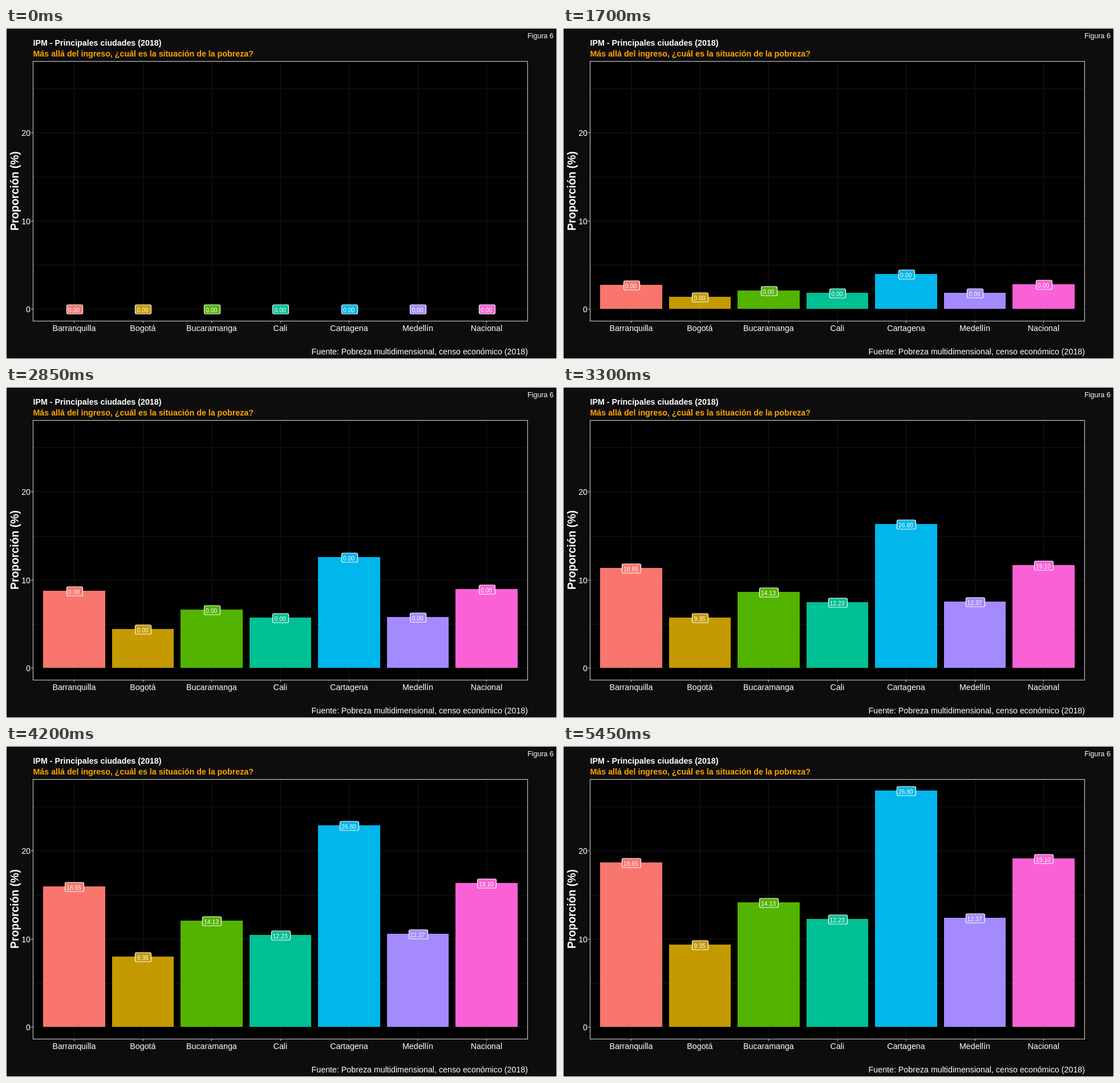
Animation of 966 by 580 pixels, one loop 8 s. Source, as an HTML page:

```html
<!DOCTYPE html>
<html lang="es">
<head>
<meta charset="utf-8">
<style>
  html, body { margin: 0; width: 966px; height: 580px; overflow: hidden; background: #0d0d0d; }
  svg { display: block; font: 14.25px "Liberation Sans", Arial, sans-serif; fill: #fff; }
  .bold { font-weight: bold; }
  .grid { stroke: #161616; }
  .tick { stroke: #b3b3b3; }
  .tag { font-size: 10.4px; text-anchor: middle; }
</style>
</head>
<body>
<svg id="stage" width="966" height="580" viewBox="0 0 966 580">
  <rect x=".5" y=".5" width="965" height="579" fill="#0d0d0d" stroke="#fff"/>
  <rect x="47" y="58" width="868" height="456" fill="#000"/>
  <g id="grid"></g>
  <g id="bars"></g>
  <rect x="47.5" y="58.5" width="867" height="455" fill="none" stroke="#d9d9d9"/>
  <g id="axes"></g>
  <g id="tags"></g>
  <text class="bold" x="47.5" y="31">IPM - Principales ciudades (2018)</text>
  <text class="bold" x="47.5" y="50" fill="#ffa500">Más allá del ingreso, ¿cuál es la situación de la pobreza?</text>
  <text x="960" y="17.5" font-size="12.5" text-anchor="end">Figura 6</text>
  <text x="915" y="572" text-anchor="end">Fuente: Pobreza multidimensional, censo económico (2018)</text>
  <text class="bold" font-size="19.4" text-anchor="middle" transform="translate(21.5 285.5) rotate(-90)">Proporción (%)</text>
</svg>
<script>
const LOOP = 8000, STEP = 50, BASE = 492.5, UNIT = 15.43, PITCH = 120.5;
const cities = [
  ["Barranquilla", 18.65, "#f8766d"],
  ["Bogotá", 9.35, "#c49a00"],
  ["Bucaramanga", 14.13, "#53b400"],
  ["Cali", 12.23, "#00c094"],
  ["Cartagena", 26.8, "#00b6eb"],
  ["Medellín", 12.37, "#a58aff"],
  ["Nacional", 19.1, "#fb61d7"]
];

function add(parent, name, attrs, text = "") {
  const el = document.createElementNS("http://www.w3.org/2000/svg", name);
  set(el, attrs);
  el.textContent = text;
  document.getElementById(parent).append(el);
  return el;
}
function set(el, attrs) {
  for (const key in attrs) el.setAttribute(key, attrs[key]);
}
function line(parent, cls, x1, y1, x2, y2) {
  add(parent, "line", { class: cls, x1, y1, x2, y2 });
}

for (let v = 0; v <= 25; v += 5) {
  const y = Math.floor(BASE - v * UNIT) + 0.5;
  line("grid", "grid", 48, y, 914, y);
  if (v % 10) continue;
  line("axes", "tick", 44, y, 47, y);
  add("axes", "text", { x: 43, y: y + 5.5, "text-anchor": "end" }, v);
}

const items = cities.map(([name, value, fill], i) => {
  const cx = 119.6 + PITCH * i;
  const gx = Math.floor(cx + 0.3) + 0.5;
  const left = Math.round(65.2 + PITCH * i);
  const right = Math.round(173.6 + PITCH * i);
  line("grid", "grid", gx, 59, gx, 513);
  line("axes", "tick", gx, 514, gx, 517);
  add("axes", "text", { x: cx - 0.2, y: 531, "text-anchor": "middle" }, name);
  return {
    value, cx,
    bar: add("bars", "rect", { x: left, width: right - left, fill }),
    box: add("tags", "rect", { height: 16, rx: 2.5, fill, stroke: "#fff", "stroke-width": 1.2 }),
    tag: add("tags", "text", { class: "tag", x: cx - 0.5 })
  };
});

function draw(time) {
  const x = Math.min(1, Math.max(0, (Math.floor(time / STEP) - 9) / 100));
  const grow = (1 - Math.cos(Math.PI * x)) / 2;
  for (const { value, cx, bar, box, tag } of items) {
    const y = BASE - value * UNIT * grow;
    const top = Math.round(y - 0.5);
    const label = (x < 0.5 ? 0 : value).toFixed(2);
    const width = label.length > 4 ? 33 : 28;
    const boxTop = Math.floor(y - 8) + 0.5;
    set(bar, { y: top, height: Math.max(0, 492 - top) });
    set(box, { x: Math.round(cx - width / 2) + 0.5, y: boxTop + 0.5, width });
    set(tag, { y: boxTop + 13 });
    if (tag.textContent !== label) tag.textContent = label;
  }
}

const start = performance.now();
function tick() {
  draw((performance.now() - start) % LOOP);
  requestAnimationFrame(tick);
}
tick();
</script>
</body>
</html>
```
